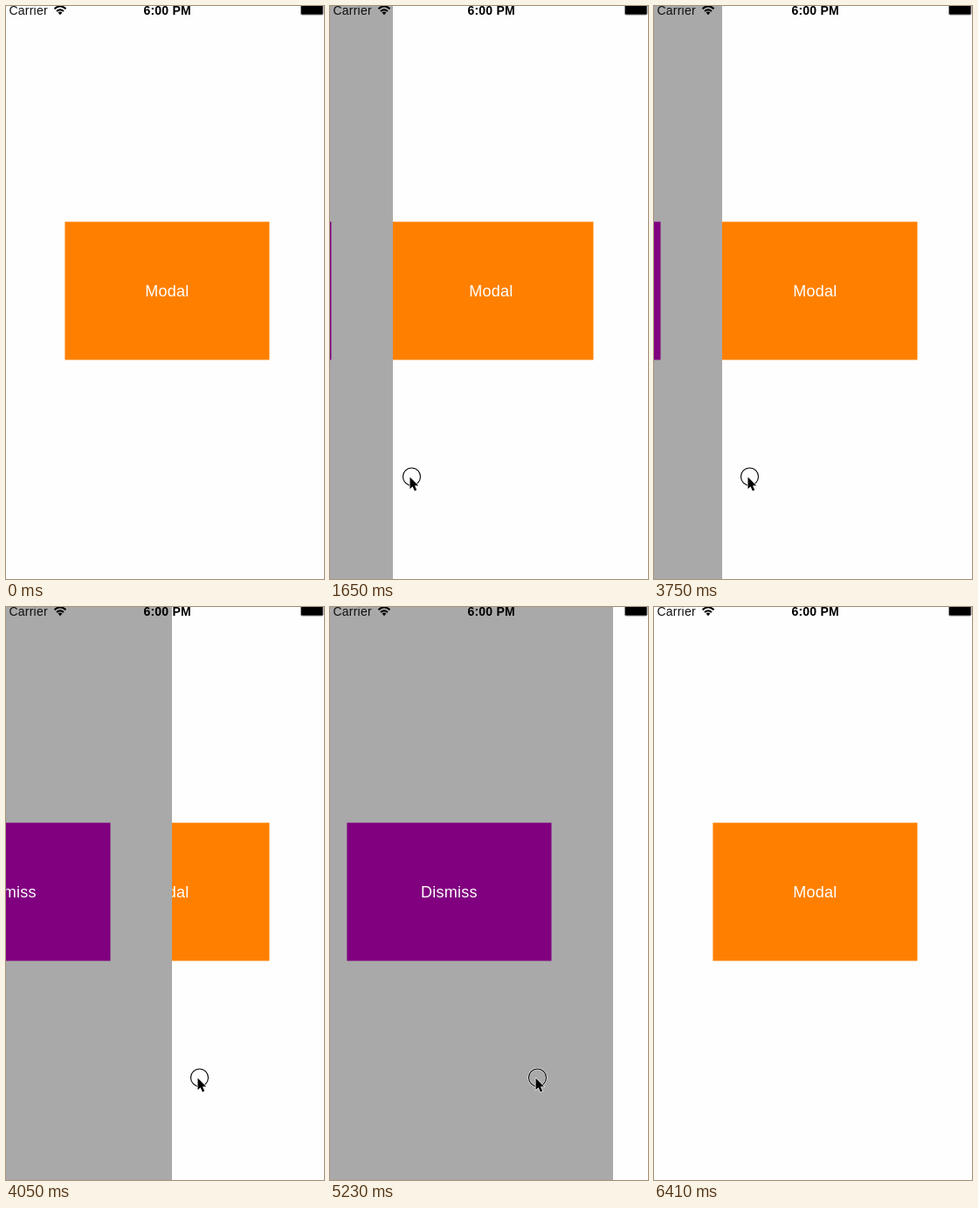
Animation of 364x655 px, one loop 7.01 s. Source, as an HTML page:

```html
<!DOCTYPE html>
<html lang="en">
<head>
<meta charset="utf-8">
<title>Swipe modal</title>
<style>
  html, body { margin: 0; width: 100%; height: 100%; overflow: hidden; background: #fefefe; }
  svg { display: block; width: 364px; height: 655px; }
  text { font-family: "Liberation Sans", Arial, sans-serif; }
  .label { font-size: 18px; letter-spacing: .25px; fill: #fff; text-anchor: middle; }
  .status { font-size: 14px; letter-spacing: .22px; fill: #111; }
  .clock { font-weight: bold; text-anchor: middle; fill: #000; }
  .wave { fill: none; stroke: #000; stroke-width: 2; }
</style>
</head>
<body>
<svg viewBox="0 0 364 655">
  <rect width="364" height="655" fill="#fefefe"/>
  <rect x="67.4" y="246.6" width="234.1" height="157.9" fill="#ff8000"/>
  <text class="label" x="184.4" y="332">Modal</text>

  <g id="panel">
    <rect width="372" height="655" fill="#a9a9a9"/>
    <rect x="67.4" y="246.6" width="234.1" height="157.9" fill="#800080"/>
    <text class="label" x="184.3" y="332">Dismiss</text>
  </g>

  <text class="status" x="3.5" y="10">Carrier</text>
  <path class="wave" d="M55.5 3.2Q62 -2.6 68.5 3.2M58 6Q62 2.4 66 6"/>
  <path d="M59.6 7.6Q62 5.6 64.4 7.6L62 10.2Z"/>
  <text class="status clock" x="184.7" y="10">6:00 PM</text>
  <rect x="337.5" y="-1.5" width="25.5" height="11.5" rx="1.5" fill="#000" stroke="#8c8c8c"/>

  <g id="pointer">
    <g id="touch" fill="none">
      <circle cx="2.5" r="10" stroke="#fff" stroke-opacity=".6" stroke-width="2.6"/>
      <circle cx="2.5" r="10" stroke="#000" stroke-width="1.1"/>
    </g>
    <path d="M.5 .5V14L3.6 11.2L5.8 16.2L8.2 15.2L6 10.3H10.2Z"
      stroke="#fff" stroke-width="1.4" paint-order="stroke" stroke-linejoin="round"/>
  </g>
</svg>
<script>
  const LOOP = 7010, PANEL = 372;
  const shortTicks = [27, 33, 37, 42];
  const [panel, pointer, touch] = ["panel", "pointer", "touch"].map(id => document.getElementById(id));

  // Pointer path: tick, x, y, easing power of the move that ends here
  const path = [
    [2, 173, 619, 1], [8, 4, 538, 0.8],
    [9, 24, 538, 1], [11, 91, 538, 0.8], [13, 91, 538, 1],
    [18, 26, 539, 1], [19, 24, 540, 1], [20, 5, 539, 1],
    [21, 24, 538, 1], [25, 107, 538, 1.1], [28, 282, 538, 1.1],
    [29, 284, 538, 1], [30, 284, 538, 1],
    [31, 281, 538, 1], [35, 235, 538, 1.7], [37, 90, 540, 1.1],
    [38, 57, 545, 1], [40, 57, 545, 1], [42, 265, 638, 1.3]
  ];

  // Ticks last 150 ms, a few of them 140 ms
  const startOf = k => 150 * k - 10 * shortTicks.filter(s => s < k).length;

  function tickAt(time) {
    let k = 0;
    while (startOf(k + 1) <= time) k++;
    return k;
  }

  function pointAt(k) {
    const i = path.findIndex(p => p[0] >= k);
    if (i < 1) return path[0].slice(1, 3);
    const [k0, x0, y0] = path[i - 1], [k1, x1, y1, power] = path[i];
    const u = ((k - k0) / (k1 - k0)) ** power;
    return [Math.round(x0 + (x1 - x0) * u), Math.round(y0 + (y1 - y0) * u)];
  }

  const within = (k, a, b) => k >= a && k <= b;

  function panelEdge(k, x) {
    if (within(k, 9, 17)) return Math.max(0, x - 19);
    if (within(k, 21, 28)) return Math.max(0, x - 29);
    if (within(k, 29, 30)) return PANEL;
    if (within(k, 31, 37)) return PANEL + Math.min(0, x - 283);
    return k === 38 ? 79 : 0;
  }

  const show = (el, on) => el.setAttribute("visibility", on ? "visible" : "hidden");
  const move = (el, x, y) => el.setAttribute("transform", `translate(${x} ${y})`);

  function draw() {
    const k = tickAt(performance.now() % LOOP);
    const [x, y] = pointAt(k);
    const visible = within(k, 2, 42);
    const pressed = within(k, 9, 17) || within(k, 21, 28) || within(k, 31, 37);
    move(panel, panelEdge(k, x) - PANEL, 0);
    move(pointer, x, y);
    show(pointer, visible);
    show(touch, visible && pressed);
    requestAnimationFrame(draw);
  }
  draw();
</script>
</body>
</html>
```
